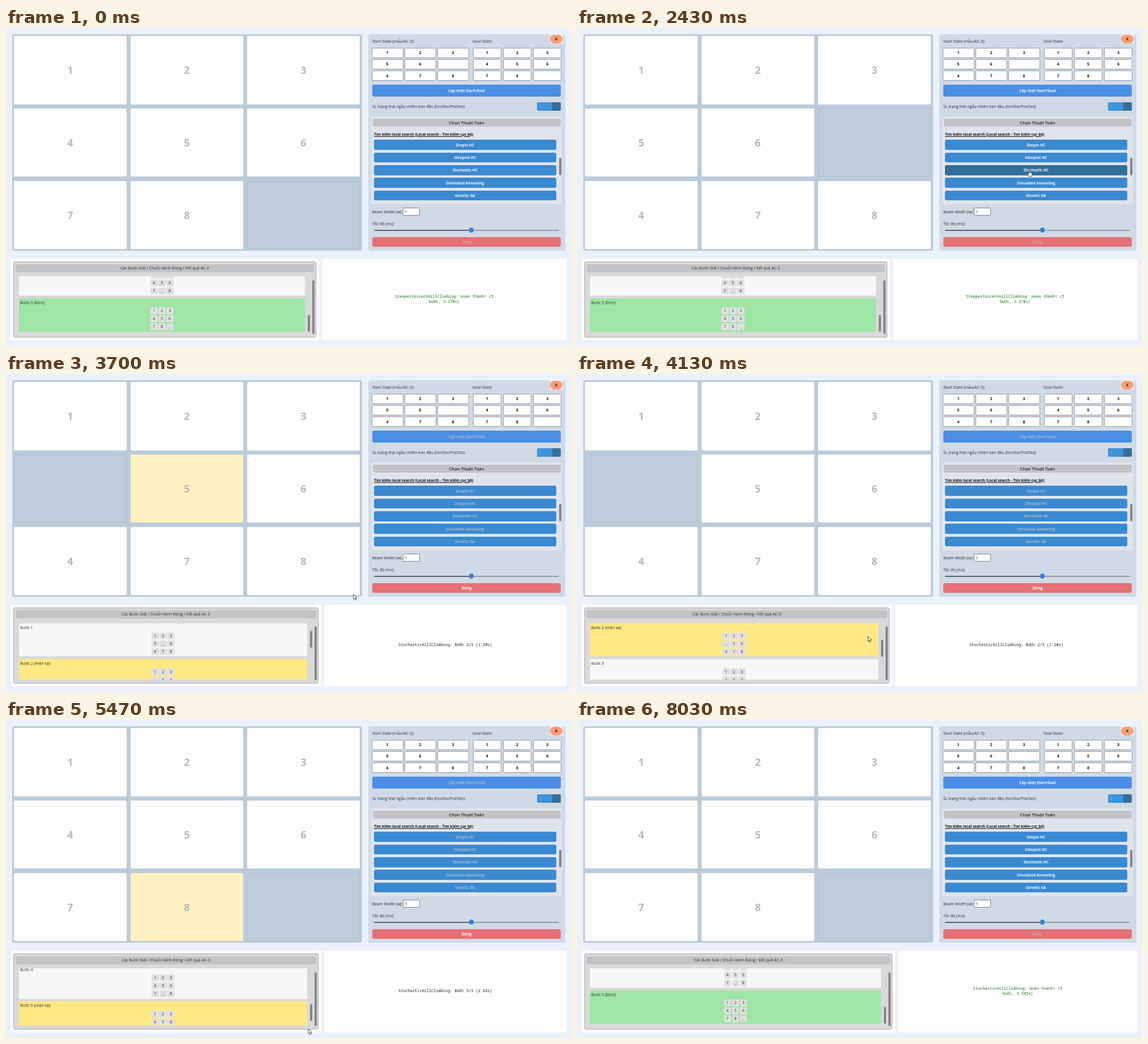
These frames come from a looping animation (998 px wide and 561 px high, 8330 ms). An HTML page:

```html
<!DOCTYPE html>
<html lang="vi">
<head>
<meta charset="utf-8">
<title>8-puzzle solver</title>
<style>
html, body { margin: 0; width: 100%; height: 100%; overflow: hidden; background: #ebf1fa; }
#stage {
  --p: 548px; --s: 0px;
  position: absolute; left: 0; top: 0; width: 998px; height: 561px; overflow: hidden;
  background: #ebf1fa; color: #2b2d30;
  font: 7px "Open Sans", "Noto Sans", sans-serif;
}
#stage div { position: absolute; box-sizing: border-box; white-space: pre; }
.mid { display: flex; align-items: center; justify-content: center; }
.left { display: flex; align-items: center; }
.board { background: #bccbd9; border-radius: 4px; }
.tile { border-radius: 2px; background: #fdfdfd; color: #b8b8b8; font-size: 18px; font-weight: 700; }
.tile.empty { background: #bfcbd9; border: 1px solid #aec2ca; }
.side { background: #d0dae4; border-radius: 4px; }
.input { background: #fdfdfd; border: 1.3px solid #8d98a4; border-radius: 1.5px; color: #111; font-weight: 700; }
.btn { border-radius: 3px; background: #3a8ad2; color: #f4f8fc; font-size: 6.5px; font-weight: 700; }
.algo.hover { background: #306f99; }
.update { background: #4a8ee6; }
.update.hover { background: #629dea; }
.stop { background: #e57076; color: #d3a5aa; }
.busy .btn { color: #a9b9c9; }
.busy .stop { color: #fff; }
.card { background: #fdfdfd; border-radius: 3px; }
.log { background: #d9d9da; border: 1px solid #a9a9ac; border-radius: 3px; }
.bar { background: #c3c3c6; border-radius: 3px; }
.thumb { background: #858589; border-radius: 2px; }
.item { left: 0; width: 100%; height: 58.5px; background: #f7f7f7; }
.item.now { background: #fde883; }
.item.goal { background: #9fe5a6; }
.cell { width: 12.5px; height: 12px; background: #e0e0e1; border-radius: 2px; }
.status { font: 6.92px/8.7px "Noto Sans Mono", "DejaVu Sans Mono", monospace; text-align: center; color: #222; }
.status.done { color: #1c761c; }
svg { position: absolute; left: 0; top: 0; overflow: visible; }
</style>
</head>
<body>
<div id="stage"></div>
<script>
const LOOP = 8330;
const UPDATE = 1600, RUN = 2470, STEP0 = 2590, STEP = 540, DONE = 5815;
const PITCH = 63.4, MAX_SCROLL = 277.5;
const PATH = ["12356_478", "1235_6478", "123_56478", "123456_78", "1234567_8", "12345678_"];
const ALGOS = ["Simple HC", "Steepest HC", "Stochastic HC", "Simulated Annealing", "Genetic GA"];
// time, x, y of the pointer tip
const POINTER = [
  [700, 994, 200], [1300, 811, 110], [1650, 811, 110], [2300, 799, 251], [3250, 799, 251],
  [4000, 514, 463], [4250, 514, 463], [5300, 534, 545], [5550, 534, 545], [6050, 605, 397], [6500, 605, 397]
];

const stage = document.getElementById("stage");
const px = v => typeof v === "number" ? v + "px" : v;

function box(parent, cls, x, y, w, h, text = "", css = "") {
  const el = document.createElement("div");
  el.className = cls;
  el.style.cssText = css;
  Object.assign(el.style, { left: px(x), top: px(y), width: px(w), height: px(h) });
  el.textContent = text;
  parent.append(el);
  return el;
}
const label = (x, y, text, css) => box(stage, "left", x, y - 6, "auto", 12, text, css);

// Board
box(stage, "board", 10.5, 10.5, 618.5, 382.5);
const tiles = [...Array(9).keys()].map(i =>
  box(stage, "tile mid", 14 + (i % 3) * 206, 14 + Math.floor(i / 3) * 127.9, 198.7, 120.6));

// Control panel
box(stage, "side", 639.5, 10.5, 348.5, 382.5);
label(647, 23, "Start State (mẫu/AC-3):");
label(824, 23, "Goal State:");
box(stage, "", 961, 11, 23, 16, "", "background:#eceff3");
box(stage, "mid", 961, 11.5, 22, 15, "X", "background:#fb9d74;border-radius:7.5px;color:#222;font-weight:700");

function inputs(state, x, step, w) {
  [...state].forEach((c, i) =>
    box(stage, "input mid", x + (i % 3) * step, 35 + Math.floor(i / 3) * 20.2, w, 17.5, c === "_" ? "" : c));
}
inputs(PATH[0], 645.5, 58, 56);
inputs(PATH[5], 824.5, 53.2, 50.5);
const caret = box(stage, "", 852, 39.5, 1, 8.5, "", "background:#111");

const buttons = [box(stage, "btn update mid", 647, 100, 333, 20.7, "Cập nhật Start/Goal")];
label(647, 138.5, "SL trạng thái ngẫu nhiên ban đầu (NoObs/PraObs):");
box(stage, "left", 938, 131, 42, 14.5, "5",
  "background:linear-gradient(90deg,#3f92d8 27px,#336f9a 27px);border-radius:2px;color:#8fb5d8;padding-left:4px");

box(stage, "", 645, 156, 337, 155, "", "background:#dfe4ec;border-radius:4px");
box(stage, "bar mid", 647.5, 159.5, 332, 14.5, "Chọn Thuật Toán", "font-size:7.6px;font-weight:600;color:#222");
label(650, 187, "Tìm kiếm local search (Local search - Tìm kiếm cục bộ)",
  "font-size:6.55px;font-weight:700;color:#111;text-decoration:underline");
ALGOS.forEach((name, i) =>
  buttons.push(box(stage, "btn algo mid", 650, 197.3 + i * 22.35, 321.5, 17.8, name)));
box(stage, "thumb", 976.5, 229, 4, 31);

label(647, 324, "Beam Width (w):");
box(stage, "left", 700.5, 317, 30.5, 14.3, "1",
  "background:#fdfdfd;border:1px solid #777f88;border-radius:1.5px;padding-left:3px");
label(647, 345, "Tốc độ (ms):");
box(stage, "", 650, 355.5, 326.5, 2, "", "border-radius:1px;background:linear-gradient(90deg,#5d6268 172px,#959ca4 172px)");
box(stage, "", 817.7, 352.2, 8.4, 8.4, "", "border-radius:50%;background:#3584d0");
box(stage, "btn stop mid", 647, 368.5, 333, 17.2, "Dừng");

// Step log; --p is its right edge, --s a small slack of the list
box(stage, "card", 8, 407, "calc(var(--p) - 3px + var(--s))", 143.5);
box(stage, "log", 13, 412.3, "calc(var(--p) - 13px)", 133.5);
box(stage, "bar mid", 16.5, 416.5, "calc(var(--p) - 20.5px)", 14.5, "Các Bước Giải / Chuỗi Hành Động / Kết quả AC-3");
const list = box(stage, "", 23, 437.7, "calc(var(--p) - 43.5px + var(--s))", 101.3, "", "overflow:hidden");
const roll = box(list, "", 0, 0, "100%", 0);
const items = PATH.map((state, k) => {
  const el = box(roll, "item", 0, k * PITCH, "100%", 58.5);
  const title = box(el, "left", 2, 1.5, "auto", 12);
  [...state].forEach((c, i) =>
    box(el, "cell mid", `calc(50% + ${(i % 3) * 14 - 20.2}px)`, 15.8 + Math.floor(i / 3) * 14, 12.5, 12, c));
  return { el, title };
});
const thumb = box(stage, "thumb", "calc(var(--p) - 14.7px + var(--s))", 438, 4, 30);
box(stage, "thumb", "calc(var(--p) - 6.8px)", 445, 4.3, 94.5);

// Status
box(stage, "card", "calc(var(--p) + 10.3px)", 407, "calc(979.4px - var(--p))", 143.5);
const status = box(stage, "status mid", "calc(var(--p) + 10.3px)", 407, "calc(979.4px - var(--p))", 143.5);

stage.insertAdjacentHTML("beforeend", `
<svg width="12" height="14" fill="#fff" stroke="#222" stroke-width=".8" stroke-linejoin="round">
  <path id="arrow" d="M0 0V8.6L2 6.8L3.5 10L5 9.4L3.6 6.2H6.2Z"/>
  <path id="hand" d="M-.9 .7Q0-.5 .9 .7V4L4 4.6Q5.2 5 5 6.6L4.2 10.8H-1.2L-3.6 7Q-3.8 5.6-2.4 6L-.9 7.2Z"/>
</svg>`);
const pointer = stage.querySelector("svg");
const arrow = document.getElementById("arrow"), hand = document.getElementById("hand");

const clamp = (v, a, b) => Math.min(b, Math.max(a, v));
const ease = u => u * u * (3 - 2 * u);
const setText = (el, s) => { if (el.textContent !== s) el.textContent = s; };

function pointerAt(t) {
  const i = POINTER.findIndex(k => k[0] > t);
  if (i < 1) return null;
  const [t0, x0, y0] = POINTER[i - 1], [t1, x1, y1] = POINTER[i];
  const u = ease((t - t0) / (t1 - t0));
  return [x0 + (x1 - x0) * u, y0 + (y1 - y0) * u];
}

function drawBoard(t, step, age) {
  const state = PATH[t < UPDATE ? 5 : step];
  const moved = step > 0 && t >= RUN && age < 300 ? PATH[step - 1].indexOf("_") : -1;
  tiles.forEach((el, i) => {
    const empty = state[i] === "_";
    setText(el, empty ? "" : state[i]);
    el.classList.toggle("empty", empty);
    el.style.background = i === moved ? "#fdf1c1" : "";
  });
}

function drawLog(t, step, age, running) {
  const finished = t < RUN || t >= DONE;
  const top = k => k ? Math.min(MAX_SCROLL, k * PITCH - 2.3) : 0;
  const u = ease(clamp((age - 80) / 300, 0, 1));
  const scroll = finished ? MAX_SCROLL : top(step - 1 > 0 ? step - 1 : 0) * (1 - u) + top(step) * u;
  stage.style.setProperty("--p", t < RUN ? "548px" : running ? "552px" : "557px");
  stage.style.setProperty("--s", running && step < 2 ? "2.5px" : "0px");
  roll.style.top = -scroll + "px";
  thumb.style.top = 438 + scroll / MAX_SCROLL * 68 + "px";
  items.forEach(({ el, title }, k) => {
    const goal = finished && k === 5, now = running && k === step;
    el.className = "item" + (goal ? " goal" : now ? " now" : "");
    setText(title, `Bước ${k}` + (goal ? " (Đích)" : now ? " (Hiện tại)" : ""));
  });
  status.classList.toggle("done", finished);
  setText(status,
    t < RUN ? "SteepestAscentHillClimbing: Hoàn thành! (5\nbước, 3.370s)" :
    running ? `StochasticHillClimbing: Bước ${step}/5 (${(0.12 + step * 0.54).toFixed(2)}s)` :
    "StochasticHillClimbing: Hoàn thành! (5\nbước, 3.345s)");
}

function drawPointer(t, running) {
  const p = pointerAt(t);
  let over = false;
  buttons.forEach(b => {
    const x = b.offsetLeft, y = b.offsetTop;
    const hit = p && p[0] > x && p[0] < x + b.offsetWidth && p[1] > y && p[1] < y + b.offsetHeight;
    b.classList.toggle("hover", !!hit && !(running && b === buttons[0]));
    over = over || hit;
  });
  pointer.style.display = p ? "" : "none";
  if (!p) return;
  pointer.style.transform = `translate(${p[0]}px, ${p[1]}px)`;
  const link = over && !running;
  hand.style.display = link ? "" : "none";
  arrow.style.display = link ? "none" : "";
}

function frame() {
  const t = performance.now() % LOOP;
  const running = t >= RUN && t < DONE;
  const step = clamp(Math.floor((t - STEP0) / STEP), 0, 5);
  const age = t - STEP0 - step * STEP;
  stage.classList.toggle("busy", running);
  drawBoard(t, step, age);
  drawLog(t, step, age, running);
  drawPointer(t, running);
  caret.style.display = t >= DONE && t < DONE + 530 ? "" : "none";
  requestAnimationFrame(frame);
}
frame();
</script>
</body>
</html>
```
